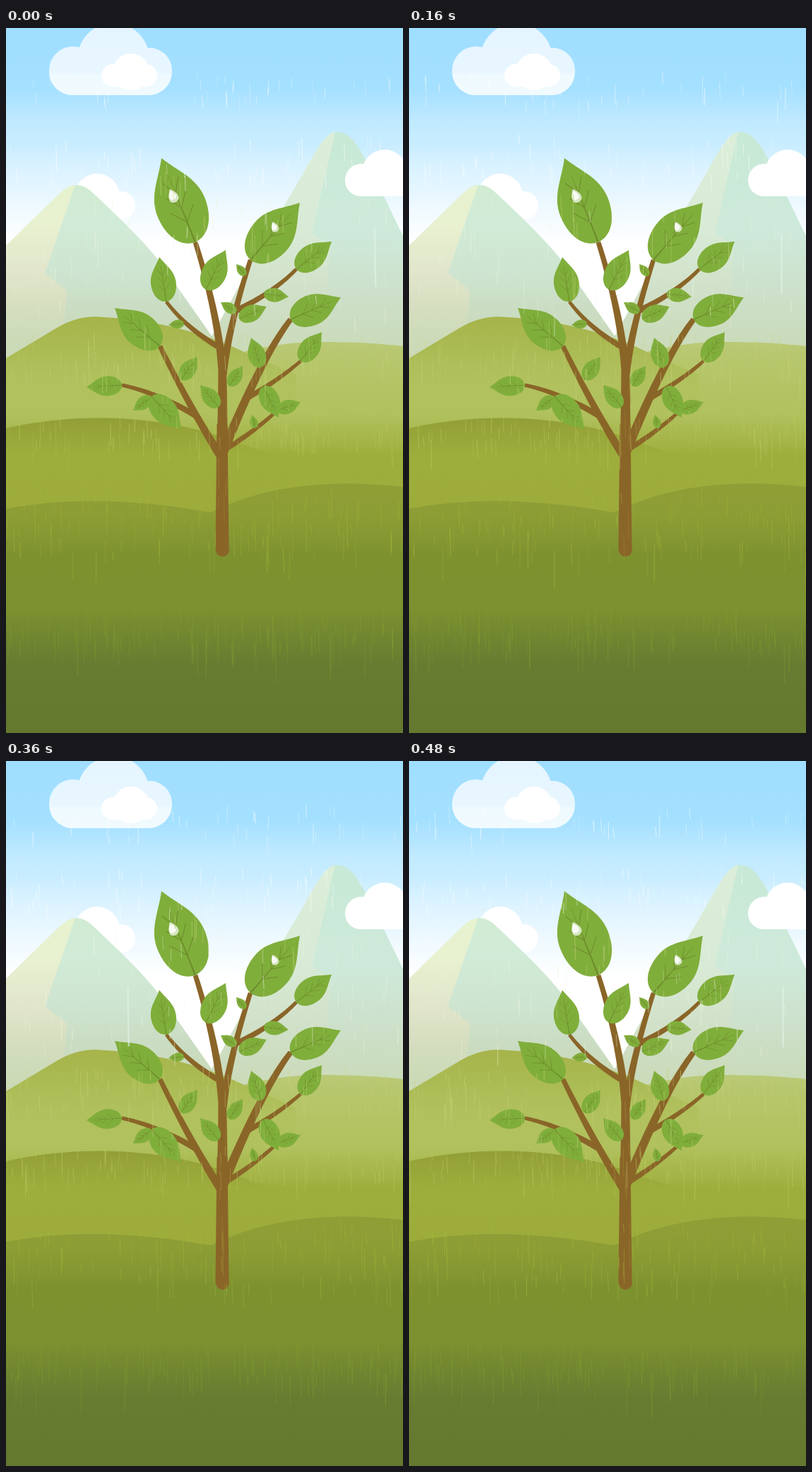
An HTML page with a canvas for the animation above (0.52 s loop, 562 by 997 pixels).

```html
<!DOCTYPE html>
<html lang="en">
<head>
<meta charset="utf-8">
<title>Rain over a sapling</title>
<style>
html, body { margin: 0; width: 100%; height: 100%; overflow: hidden; }
canvas { display: block; }
</style>
</head>
<body>
<canvas id="stage" width="562" height="997"></canvas>
<script>
const W = 562, H = 997, STEP = 40, STEPS = 13;
const view = document.getElementById('stage').getContext('2d');
const scene = document.createElement('canvas');
scene.width = W;
scene.height = H;
const g = scene.getContext('2d');

// Vertical gradient from "y colour" pairs
function shade(stops) {
  const list = stops.split(',').map(s => s.trim().split(' '));
  const top = +list[0][0], span = list[list.length - 1][0] - top;
  const grad = g.createLinearGradient(0, top, 0, top + span);
  list.forEach(([y, c]) => grad.addColorStop((y - top) / span, c));
  return grad;
}

function area(d, fill) {
  g.fillStyle = fill;
  g.fill(new Path2D(d));
}

// Pill-shaped base with round puffs on top
function cloud(left, right, bottom, r, fill, ...puffs) {
  const p = new Path2D();
  p.roundRect(left, bottom - 2 * r, right - left, 2 * r, r);
  puffs.forEach(([x, y, rad]) => {
    p.moveTo(x + rad, y);
    p.arc(x, y, rad, 0, 7);
  });
  g.fillStyle = fill;
  g.fill(p);
}

// Tapered quadratic limb
function limb(x0, y0, cx, cy, x1, y1, w0, w1) {
  const a = [], b = [];
  for (let i = 0; i <= 20; i++) {
    const t = i / 20, u = 1 - t;
    const x = u * u * x0 + 2 * u * t * cx + t * t * x1;
    const y = u * u * y0 + 2 * u * t * cy + t * t * y1;
    const ang = Math.atan2(u * (cy - y0) + t * (y1 - cy), u * (cx - x0) + t * (x1 - cx));
    const r = (w0 * u + w1 * t) / 2, nx = Math.sin(ang) * r, ny = Math.cos(ang) * r;
    a.push([x - nx, y + ny]);
    b.unshift([x + nx, y - ny]);
  }
  g.beginPath();
  a.concat(b).forEach(p => g.lineTo(...p));
  g.fill();
}

const foliage = new Path2D();

// Leaf from its base to its tip; the width follows the length
function leaf(x0, y0, x1, y1) {
  const dx = x1 - x0, dy = y1 - y0, len = Math.hypot(dx, dy), h = len * .28;
  const m = new DOMMatrix([dx / len, dy / len, -dy / len, dx / len, x0, y0]);
  const half = k =>
    `M0 0C${.01 * len} ${.62 * k} ${.19 * len} ${k} ${.42 * len} ${k}` +
    `C${.66 * len} ${k} ${.8 * len} ${.4 * k} ${len} 0`;
  const shape = new Path2D(half(h) + half(-h));
  foliage.addPath(shape, m);
  g.save();
  g.transform(m.a, m.b, m.c, m.d, m.e, m.f);
  g.fillStyle = '#80ae3b';
  g.fill(shape);
  g.fillStyle = g.strokeStyle = '#6e8d2c';
  limb(0, 0, len * .4, 0, len * .8, 0, Math.max(.8, len / 50), .5);
  g.lineWidth = Math.max(.5, len / 115);
  g.beginPath();
  for (let k = .24; k < .6; k += .17) {
    for (const side of [-1, 1]) {
      g.moveTo(k * len, 0);
      g.lineTo((k + .16) * len, side * h * (.6 - k * .45));
    }
  }
  g.stroke();
  g.restore();
}

// Limb ending in a leaf; longer limbs are thicker
function branch(x0, y0, cx, cy, x1, y1, tipX, tipY) {
  const w = 4 + Math.hypot(x1 - x0, y1 - y0) * .043;
  g.fillStyle = '#8a6528';
  limb(x0, y0, cx, cy, x1, y1, w, w * .58);
  leaf(x1, y1, tipX, tipY);
}

function drop(x, y, s) {
  g.save();
  g.translate(x, y);
  g.rotate(-.35);
  g.scale(s, s);
  const d = 'M-1 -11C3 -8 8 -2 8 4C8 8 4 11 0 11C-5 11 -8 8 -7 3C-7 -2 -3 -6 -1 -11Z';
  area(d, '#d7e5c2');
  g.translate(-1, -1);
  g.scale(.7, .7);
  area(d, '#f8fbf3');
  g.restore();
}

function drawLand() {
  g.fillStyle = shade('0 #a0deff, 84 #a4e0ff, 135 #c1eaff, 165 #c9edff, 195 #d9f2ff, 260 #f1faff, 305 #fff, 997 #fff');
  g.fillRect(0, 0, W, H);
  cloud(61, 235, 95, 33, shade('0 #e5f5ff, 63 #e8f6ff, 66 #effaff, 95 #f0faff'), [152, 44, 51], [95, 60, 34], [203, 60, 32]);
  cloud(135, 214, 83, 16, '#fff', [177, 62, 26]);
  cloud(71, 183, 271, 20, '#fff', [129, 238, 32]);

  // Mountains, each with a lighter left face
  area('M290 438C320 385 370 289 405 233C430 192 450 147 469 147C489 147 500 170 515 197L562 294V480H290Z',
    shade('147 #c8e9d3eb, 290 #cbe8d8f0, 370 #cce0cafa, 450 #c9dbb9'));
  area('M290 438C320 385 370 289 405 233C430 192 448 149 466 147L433 290L460 308L455 370L460 480H290Z',
    shade('147 #deefd9e6, 290 #dbebd5cc, 370 #d3e1c8b3, 430 #cfdbbd66'));
  area('M0 308L75 235Q100 209 125 235C165 273 196 302 220 334L293 438V490H0Z',
    shade('222 #cdeacfeb, 275 #ceead5f2, 345 #cde4cffa, 400 #cadcc2, 450 #cadab8'));
  area('M0 308L75 235Q87 223 98 222L55 347L87 372L82 420V490H0Z',
    shade('222 #e9f3cfeb, 280 #e9f1d0f2, 345 #e2e6cbf2, 380 #dbe0c2e6, 450 #cddab680'));
  cloud(480, 620, 238, 22, '#fff', [536, 204, 32], [503, 215, 23]);

  // Hills, back to front
  area('M290 470C340 456 390 444 440 444C490 444 530 446 562 450V640H290Z',
    shade('444 #bac976, 475 #b6c66a, 545 #b1c15e, 605 #9eae3c'));
  area('M0 467L72 424Q104 405 138 409C205 412 280 429 345 462L410 490V610H0Z',
    shade('408 #a6b44a, 455 #abbb54, 500 #b1c15e, 545 #b1c15e, 605 #9eae3c'));
  area('M0 566C95 545 190 548 270 568C315 580 350 596 380 604H562V720H0Z',
    shade('552 #929f37, 605 #9eae3c, 690 #9dab3b'));
  area('M0 680C80 665 170 664 290 685C360 650 450 636 562 649V997H0Z',
    shade('643 #909e36, 690 #8d9d35, 745 #7d922f, 820 #7c912f, 860 #718630, 900 #677c31, 997 #64782f'));
}

function drawTree() {
  g.fillStyle = '#8a6528';
  limb(306, 738, 306, 650, 306, 560, 19, 15);
  g.beginPath();
  g.arc(306.5, 738, 9.5, 0, 7);
  g.fill();
  limb(306, 590, 307, 530, 306, 466, 15, 11);

  branch(306, 480, 299, 400, 268, 303, 220, 184);
  branch(307, 490, 316, 420, 346, 328, 416, 247);
  branch(304, 606, 262, 540, 218, 450, 154, 396);
  branch(306, 603, 362, 465, 403, 412, 474, 381);
  branch(310, 596, 350, 572, 384, 541, 417, 529);
  branch(340, 524, 385, 499, 417, 471, 447, 430);
  branch(270, 549, 215, 516, 164, 505, 114, 508);
  branch(299, 450, 255, 424, 227, 387, 217, 324);
  branch(323, 401, 378, 375, 411, 341, 461, 302);

  leaf(283, 370, 311, 314);
  leaf(248, 497, 271, 465);
  leaf(301, 536, 275, 505);
  leaf(316, 506, 335, 478);
  leaf(206, 522, 180, 541);
  leaf(206, 521, 248, 567);
  leaf(361, 480, 347, 438);
  leaf(364, 507, 386, 551);
  leaf(353, 566, 348, 547);
  leaf(330, 411, 369, 394);
  leaf(365, 376, 400, 380);
  leaf(326, 402, 304, 388);
  leaf(339, 350, 326, 334);
  leaf(252, 418, 230, 420);
  drop(236, 237, .92);
  drop(380, 281, .7);
}

function random(seed) {
  return () => {
    seed = seed + 0x6D2B79F5 | 0;
    let t = Math.imul(seed ^ seed >>> 15, 1 | seed);
    t = t + Math.imul(t ^ t >>> 7, 61 | t) ^ t;
    return ((t ^ t >>> 14) >>> 0) / 4294967296;
  };
}

function drawRain(step) {
  const r = random(step * 7919 + 17);
  const mix = (a, b) => a + (b - a) * r();

  function streak(x, y, len, colour, alpha, width = 1) {
    view.globalAlpha = alpha;
    view.strokeStyle = colour;
    view.lineWidth = width;
    view.beginPath();
    view.moveTo(x, y);
    view.lineTo(x + mix(-.6, 1.4), y + len);
    view.stroke();
  }

  // Nearer bands hold more and longer streaks
  function band(top, bottom, colour) {
    for (let i = 0; i < 30 + top / 8; i++) {
      const len = 12 + (18 + top / 20) * r() * r();
      streak(mix(0, W), mix(top, bottom), len, colour, mix(.2, .6));
    }
  }

  band(62, 105, '#fff');
  band(150, 210, '#fff');
  band(235, 410, '#eef7de');
  band(430, 490, '#c8d37a');
  band(545, 585, '#beca62');
  band(648, 745, '#a4b73a');
  band(820, 872, '#869e32');
  streak(step % 2 ? mix(80, 180) : mix(500, 555), mix(280, 320), 85, '#e1f3e8', .6, 2.5);

  view.save();
  view.clip(foliage);
  for (let i = 0; i < 75; i++) {
    streak(mix(110, 480), mix(180, 560), mix(12, 50), '#b5cc6c', mix(.3, .8));
  }
  view.restore();
  for (let i = 0; i < 5; i++) {
    streak(mix(299, 313), mix(500, 700), mix(15, 45), '#a48436', .5);
  }
  view.globalAlpha = 1;
}

drawLand();
drawTree();
let shown = -1;
function tick() {
  const step = Math.floor(performance.now() / STEP) % STEPS;
  if (step !== shown) {
    shown = step;
    view.drawImage(scene, 0, 0);
    drawRain(step);
  }
  requestAnimationFrame(tick);
}
tick();
</script>
</body>
</html>
```
